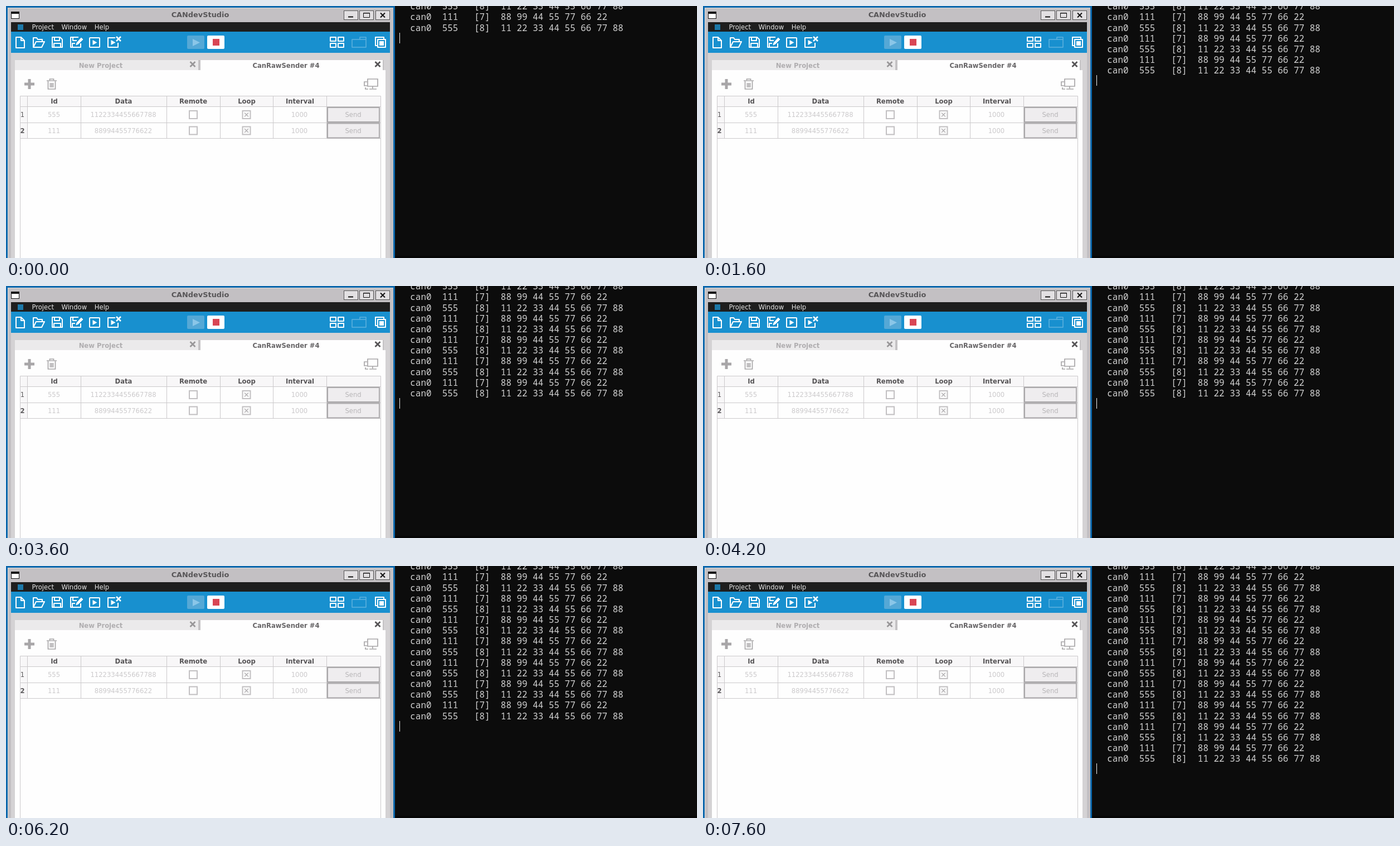
An HTML page for the animation above (8 s loop, 1240 by 452 pixels).

```html
<!DOCTYPE html>
<html lang="en">
<head>
<meta charset="utf-8">
<title>CAN raw sender</title>
<style>
  html, body { margin: 0; width: 100%; height: 100%; overflow: hidden; background: #0c0c0c; }
  svg { display: block; width: 1240px; height: 452px; }
  text { font: 11.6px "DejaVu Sans", sans-serif; text-anchor: middle; }
  .b { font-weight: bold; }
  .line { fill: none; stroke: #fff; stroke-width: 2; stroke-linejoin: round; }
  .grey { fill: none; stroke: #a8a6a8; stroke-width: 2; }
  #term text { font: 15.95px "Noto Sans Mono", monospace; text-anchor: start; white-space: pre; fill: #d2d2d2; }
</style>
</head>
<body>
<svg viewBox="0 0 1240 452">
  <!-- desktop and window frame -->
  <rect width="699" height="452" fill="#0b68ad"/>
  <rect x="3" y="3" width="692" height="449" fill="#c3c0c3"/>
  <rect x="3" y="3" width="692" height="1" fill="#dcdadc"/>
  <rect x="3" y="3" width="1" height="449" fill="#dcdadc"/>
  <rect x="9" y="10" width="15" height="13" fill="#111"/>
  <rect x="10" y="14" width="13" height="8" fill="#fff"/>
  <text class="b" x="348.5" y="20" fill="#585658" style="font-size:12.9px">CANdevStudio</text>
  <g fill="#e2e0e2" stroke="#555" stroke-width="1">
    <rect x="606.5" y="8.5" width="25" height="16"/>
    <rect x="634.5" y="8.5" width="25" height="16"/>
    <rect x="663.5" y="8.5" width="25" height="16"/>
  </g>
  <g fill="none" stroke="#111">
    <path d="M614 19.5h9" stroke-width="2"/>
    <path d="M641.5 12.5h11v8h-11zM641 13h12"/>
    <path d="M672 12.500l8 8m0-8l-8 8" stroke-width="2"/>
  </g>

  <!-- menu bar -->
  <rect x="9" y="29" width="680" height="17" fill="#1e1e1e"/>
  <rect x="21" y="33" width="10" height="10" fill="#1c78a8"/>
  <g fill="#e4e4e4">
    <text x="66.300" y="42">Project</text>
    <text x="122.300" y="42">Window</text>
    <text x="172" y="42">Help</text>
  </g>

  <!-- toolbar -->
  <rect x="9" y="46" width="680" height="38" fill="#1890cf"/>
  <g class="line">
    <path d="M18 56h9l6 6v13H18zM27 56v6h6"/>
    <path d="M49 74V57h6l2 3h8v4M49 74l5-10h15l-5 10z"/>
    <path id="disk" d="M83 56h14l4 4v14H83zM87 56v6h9v-6M86 74v-7h12v7"/>
    <path d="M130 56h-14v18h18v-7M120 56v6h7M119 74v-7h5"/>
    <path d="M126 70l1-4 8-9 3 3-8 8z" fill="#fff" stroke-width="1"/>
    <rect x="150" y="57" width="18" height="17" rx="1"/>
    <path d="M196 57h-13v17h18v-8"/>
    <path d="M198 55l8 8m0-8l-8 8" stroke-width="2.500"/>
    <path d="M582 56h10v7h-10zM596 56h10v7h-10zM582 67h10v7h-10zM596 67h10v7h-10z"/>
    <path d="M621 74V60h14v-4h11v18zM621 60h25" stroke="#5fb1de" stroke-width="1.500"/>
    <path d="M666 71h-3V56h15v3"/>
    <rect x="667" y="60" width="14" height="14"/>
  </g>
  <path d="M155.500 61v9l8-4.500zM188.500 61v9l8-4.500z" fill="#fff"/>
  <rect x="670" y="63" width="8" height="8" fill="#fff"/>
  <rect x="325" y="53" width="31" height="24" rx="2" fill="#55a8d6"/>
  <path d="M335 59v13l13-6.500z" fill="#8ac6e8"/>
  <rect x="361" y="53" width="31" height="24" rx="2" fill="#fff"/>
  <rect x="371" y="59" width="12" height="12" fill="#d94654"/>

  <!-- tabs and page -->
  <rect x="9" y="84" width="680" height="368" fill="#d4d2d4"/>
  <rect x="16" y="97" width="329" height="18" fill="#ebeaeb"/>
  <rect x="345" y="97" width="4" height="18" fill="#c4c2c4"/>
  <rect x="349" y="97" width="327" height="18" fill="#fefefe"/>
  <rect x="676" y="97" width="2" height="18" fill="#c4c2c4"/>
  <rect x="16" y="115" width="665" height="337" fill="#fefefe"/>
  <text class="b" x="170" y="111" fill="#b0aeb0">New Project</text>
  <text class="b" x="502.500" y="111" fill="#676567">CanRawSender #4</text>
  <g fill="none" stroke-width="2.800">
    <path d="M330.500 100l9 9m0-9l-9 9" stroke="#999799"/>
    <path d="M662.500 100l9 9m0-9l-9 9" stroke="#565456"/>
  </g>
  <path d="M33 140h18M42 131v18" stroke="#a8a6a8" stroke-width="5"/>
  <g class="grey">
    <path d="M73 134h18M78.500 133v-2h7v2M75.500 135v14h13v-14M79.500 138v8M82 138v8M84.500 138v8" stroke-width="1.700"/>
    <path d="M649 131h18v13h-18zM658 144v4M652 149h13M648 136h-5v7h5M645 146v3h5" stroke-width="1.700"/>
  </g>

  <!-- table -->
  <rect x="26" y="162" width="646" height="18" fill="#f8f7f8"/>
  <rect x="26" y="181" width="13" height="57" fill="#f8f7f8"/>
  <path d="M25.500 452V161.500H672.500V452M26 180.500H672M26 209.500H672M26 237.500H672M38.500 162V238M134.500 162V238M288.500 162V238M384.500 162V238M479.500 162V238M575.500 162V238" fill="none" stroke="#cbc9cb"/>
  <g id="table"></g>

  <!-- terminal -->
  <rect x="698" width="542" height="452" fill="#0c0c0c"/>
  <rect x="698" y="448" width="542" height="4" fill="#060606"/>
  <g id="term"></g>
  <rect id="cursor" x="706" width="1" height="19" fill="#f2f2f2"/>
</svg>
<script>
const $ = id => document.getElementById(id);

const label = (x, y, s, fill, cls = "") =>
  `<text class="${cls}" x="${x}" y="${y}" fill="${fill}">${s}</text>`;

function tableRow(y, number, id, data) {
  const mid = y + 4.2;
  return label(29.5, mid, number, "#5c5a5c", number == 2 ? "b" : "") +
    label(86, mid, id, "#cccacc") +
    label(210.5, mid, data, "#cccacc") +
    label(526.5, mid, 1000, "#cccacc") +
    `<path class="grey" style="stroke:#c2c0c2" d="M329 ${y - 7}h14v14h-14zM424.500 ${y - 7}h14v14h-14z"/>
     <path class="grey" style="stroke:#b4b2b4;stroke-width:1.500" d="M428 ${y - 3.5}l7 7m0-7l-7 7"/>
     <rect x="577" y="${y - 13}" width="93" height="26" fill="#efedef" stroke="#aaa8aa" stroke-width="2"/>` +
    label(623, mid, "Send", "#b8b6b8");
}

const heads = [["Id", 86.5], ["Data", 211], ["Remote", 336], ["Loop", 432], ["Interval", 527.5]];
$("table").innerHTML =
  heads.map(([s, x]) => label(x, 175, s, "#565456", "b")).join("") +
  tableRow(195, 1, 555, "1122334455667788") +
  tableRow(223.5, 2, 111, "88994455776622");

const PITCH = 115 / 6, LOOP = 8000;
const messages = [
  "can0  555   [8]  11 22 33 44 55 66 77 88",
  "can0  111   [7]  88 99 44 55 77 66 22"
];
let shown = -1;

// Two messages arrive each second, first at 600 ms.
function draw() {
  const pairs = Math.floor((performance.now() % LOOP + 400) / 1000);
  if (pairs !== shown) {
    shown = pairs;
    let rows = "";
    for (let i = 0; i < 3 + 2 * pairs; i++)
      rows += `<text x="725.300" y="${6.2 + i * PITCH}">${messages[i % 2]}</text>`;
    $("term").innerHTML = rows;
    $("cursor").setAttribute("y", Math.floor(48 + 2 * pairs * PITCH + 0.01));
  }
  requestAnimationFrame(draw);
}
draw();
</script>
</body>
</html>
```
